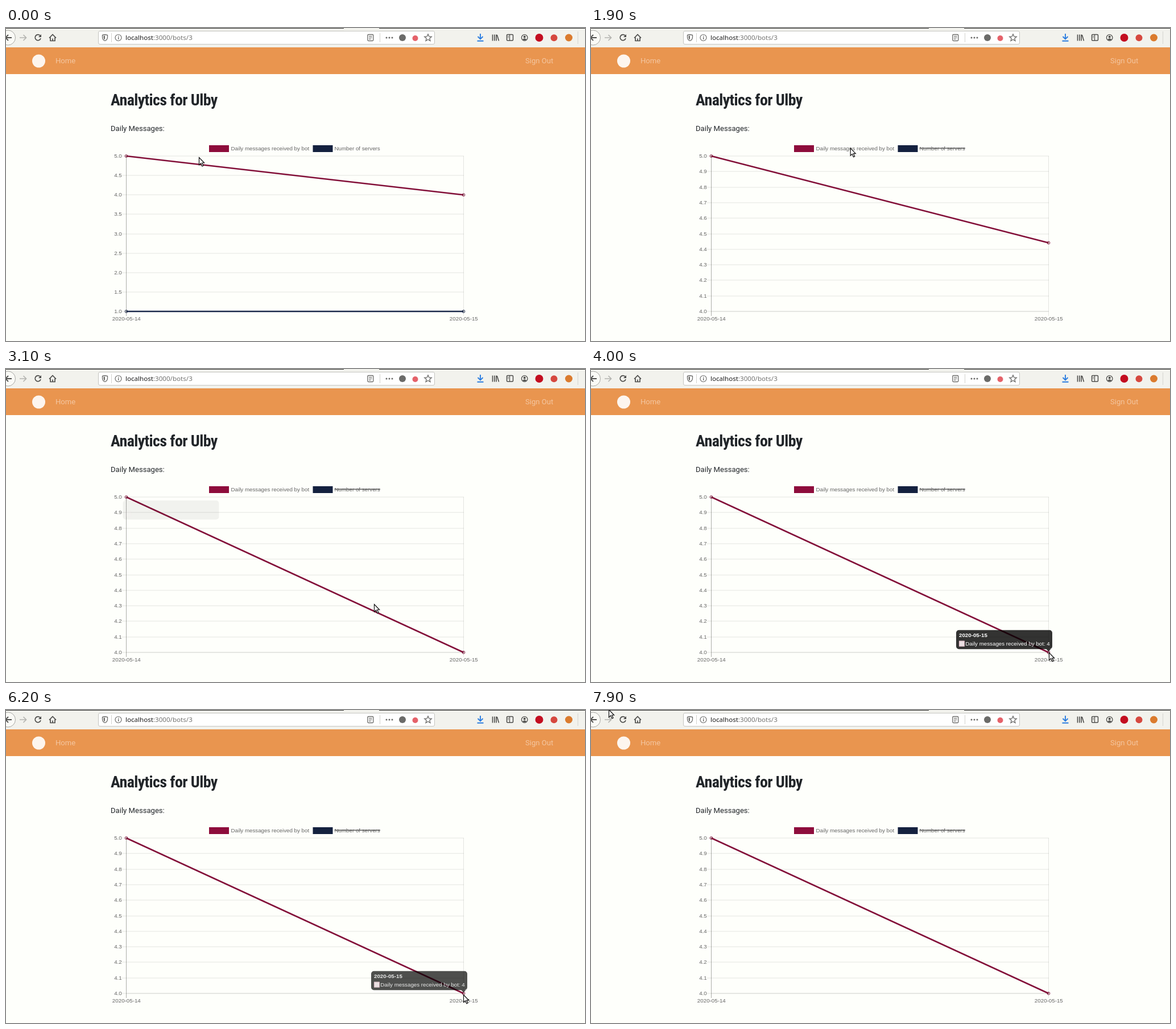
Recreate the animation shown at these times as an HTML page with a canvas. Size 1018x550 px, loop 8 s.

```html
<!DOCTYPE html>
<html lang="en">
<head>
<meta charset="utf-8">
<title>Bot analytics</title>
<style>
html, body { margin: 0; width: 100%; height: 100%; overflow: hidden; background: #fefffb; }
canvas { display: block; }
</style>
</head>
<body>
<canvas id="stage" width="1018" height="550"></canvas>
<script>
const ctx = document.getElementById('stage').getContext('2d');
const LOOP = 8000, STEP = 100, HIDE_AT = 1776;
const MAROON = '#8e0d3c', NAVY = '#14213f', INK = '#212529', ICON = '#4d4d4b';
const LEFT = 211.5, RIGHT = 804.5, TOP = 225, BOTTOM = 498;
const SMALL = '9.75px "Liberation Sans", Arial, sans-serif';
const BODY = '13.1px Roboto, sans-serif';

// Cursor stops: time, x, y
const stops = [
  [200, 339, 227], [300, 320, 240], [500, 392, 264], [600, 392, 264],
  [700, 437, 235], [800, 405, 192], [900, 377, 220], [1000, 377, 220],
  [1300, 401, 207], [1400, 401, 207], [1700, 597, 207], [1800, 597, 207],
  [2100, 173, 218], [2400, 215, 229], [2500, 212, 226], [2800, 213, 226],
  [3100, 647, 413], [3600, 800, 494], [4000, 805, 498], [5400, 805, 498],
  [5500, 804, 500], [6300, 804, 500], [7200, 324, 376], [7300, 324, 376],
  [7700, 60, 90], [7900, 31, -1]
];

const clamp = v => Math.min(1, Math.max(0, v));
const easeOut = v => 1 - (1 - clamp(v)) ** 4;
const fade = (t, start, end) => easeOut((t - start) / 400) * (1 - easeOut((t - end) / 400));

function text(str, x, y, font, color, align = 'left') {
  ctx.font = font;
  ctx.fillStyle = color;
  ctx.textAlign = align;
  ctx.fillText(str, x, y);
}

function rect(x, y, w, h, color) {
  ctx.fillStyle = color;
  ctx.fillRect(x, y, w, h);
}

function path(d, stroke, width = 1.5, fill) {
  const p = new Path2D(d);
  if (fill) { ctx.fillStyle = fill; ctx.fill(p); }
  if (stroke) { ctx.strokeStyle = stroke; ctx.lineWidth = width; ctx.stroke(p); }
}

function circle(x, y, r, fill, stroke, width = 1) {
  ctx.beginPath();
  ctx.arc(x, y, r, 0, Math.PI * 2);
  if (fill) { ctx.fillStyle = fill; ctx.fill(); }
  if (stroke) { ctx.strokeStyle = stroke; ctx.lineWidth = width; ctx.stroke(); }
}

function roundRect(x, y, w, h, r, fill, stroke, width = 1) {
  ctx.beginPath();
  ctx.roundRect(x, y, w, h, r);
  if (fill) { ctx.fillStyle = fill; ctx.fill(); }
  if (stroke) { ctx.strokeStyle = stroke; ctx.lineWidth = width; ctx.stroke(); }
}

function drawToolbar() {
  rect(0, 0, 1018, 34, '#f2f2ed');
  rect(0, 0, 594, 1, '#353533');
  rect(656, 0, 362, 1, '#353533');

  circle(3.5, 17, 13, '#fafaf6', '#a9a9a5');
  path('M10 17H-2M4 12L-1 17L4 22', ICON, 1.8);
  path('M24 17H35M30.5 12L35.5 17L30.5 22', '#b4b4b0', 1.7);
  path('M60 13.5A5 5 0 1 0 61 18', ICON, 1.7);
  path('M62 11V16H57Z', null, 0, ICON);
  path('M76 17.5L82 11.5L88 17.5M78 16.5V22.5H86V16.5M82 22V18.5', ICON, 1.7);

  roundRect(162.5, 5.5, 591, 23, 2.5, '#fff', '#c5c5c1');
  path('M169.5 12.5L174 11.5L178.5 12.5V16C178.5 19.5 176.5 21.5 174 22.5C171.5 21.5 169.5 19.5 169.5 16Z', '#6b6b69', 1.3);
  path('M174 13.5V20.5C172 19.5 171.5 18 171.5 14Z', null, 0, '#6b6b69');
  rect(185, 9, 1, 16, '#d2d2ce');
  circle(197.5, 17, 5.5, null, '#6b6b69', 1.2);
  rect(197, 16, 1.4, 4, '#6b6b69');
  rect(197, 13.7, 1.4, 1.4, '#6b6b69');
  const urlFont = '11.6px "Noto Sans", "Open Sans", sans-serif';
  text('localhost', 210, 21, urlFont, '#1c1c1c');
  text(':3000/bots/3', 210 + ctx.measureText('localhost').width, 21, urlFont, '#747472');

  roundRect(635.8, 11.5, 10, 11, 1.5, null, '#6b6b69', 1.3);
  path('M638 14.5H643.5M638 17H643.5M638 19.5H641.5', '#6b6b69', 1);
  rect(657, 9, 1, 16, '#d2d2ce');
  for (let i = 0; i < 3; i++) circle(669 + i * 5, 17, 1.5, '#6b6b69');
  circle(697, 17, 6, '#6b6b69');
  circle(719.5, 18, 5, '#e5626a');
  path('M742 10.8L743.8 15L748.2 15.3L744.8 18.2L745.9 22.6L742 20.2L738.1 22.6L739.2 18.2L735.8 15.3L740.2 15Z', '#6b6b69', 1.3);

  path('M834 10V19M829.5 15L834 19.5L838.5 15M828.5 22.8H839.5', '#2b7de0', 1.9);
  path('M855.5 11.5V22.5M858.8 11.5V22.5M862 11.5V22.5M863.3 12L866.5 22.5', ICON, 1.6);
  roundRect(880.5, 11.5, 11, 10.5, 1.5, null, ICON, 1.5);
  path('M885.5 12V22M882 14.5H884M882 17H884', ICON, 1.2);
  circle(911.7, 17, 5.3, null, ICON, 1.3);
  circle(911.7, 15.4, 2, ICON);
  path('M908.3 20Q911.7 16.5 915.1 20Q911.7 23 908.3 20Z', null, 0, ICON);
  circle(937.5, 17, 7, '#c30d20');
  circle(963.5, 17.3, 6, '#d6483f');
  circle(989.5, 17, 6.5, '#db7b2e');
  rect(1005, 6, 1, 22, '#d5d5d0');
}

function drawPage() {
  rect(0, 34, 1018, 47, '#e9954f');
  circle(57.5, 58, 11.5, '#fdf5ee');
  text('Home', 87, 61.5, BODY, '#f4c6a0');
  text('Sign Out', 913, 61.5, BODY, '#f4c6a0');
  ctx.letterSpacing = '-0.6px';
  text('Analytics for Ulby', 184, 135.5,
    'bold condensed 28px "Roboto Condensed", "Open Sans Condensed", Roboto, sans-serif', INK);
  ctx.letterSpacing = '0px';
  text('Daily Messages:', 184, 180.5, BODY, INK);
}

function drawSeries(y0, y1, color) {
  path(`M${LEFT} ${y0}L${RIGHT} ${y1}`, color, 2.5);
  circle(LEFT, y0, 2.4, 'rgba(0,0,0,.1)', color, 0.9);
  circle(RIGHT, y1, 2.4, 'rgba(0,0,0,.1)', color, 0.9);
}

function drawChart(t) {
  const hidden = t >= HIDE_AT;
  rect(357, 206, 35, 12, MAROON);
  text('Daily messages received by bot', 395.5, 214.5, SMALL, '#666');
  rect(539.5, 206, 35, 12, NAVY);
  text('Number of servers', 577.5, 214.5, SMALL, '#666');
  if (hidden) rect(577.5, 210.5, 80.5, 1.6, '#666');

  const count = hidden ? 10 : 8, size = hidden ? 0.1 : 0.5;
  for (let i = 0; i <= count; i++) {
    const y = Math.round(TOP + (BOTTOM - TOP) * i / count);
    rect(204, y - 0.5, 601, 1, 'rgba(0,0,0,.1)');
    text((5 - i * size).toFixed(1), 203.7, y + 3, SMALL, '#666', 'right');
  }
  rect(LEFT - 0.5, TOP, 1, BOTTOM - TOP + 8, 'rgba(0,0,0,.32)');
  rect(RIGHT - 0.5, TOP, 1, BOTTOM - TOP + 8, 'rgba(0,0,0,.1)');
  rect(LEFT, BOTTOM - 0.5, RIGHT - LEFT, 1, 'rgba(0,0,0,.1)');
  text('2020-05-14', LEFT + 0.3, 514.3, SMALL, '#666', 'center');
  text('2020-05-15', RIGHT + 0.3, 514.3, SMALL, '#666', 'center');

  const startY = TOP + (BOTTOM - TOP) / 4;
  const endY = startY + (BOTTOM - startY) * easeOut((t - HIDE_AT) / 1000);
  if (!hidden) drawSeries(BOTTOM, BOTTOM, '#1b294b');
  drawSeries(TOP, endY, '#831039');
}

function drawTooltip(x, y, caret, title, value, alpha) {
  if (alpha < 0.005) return;
  ctx.save();
  ctx.globalAlpha = alpha;
  const bubble = new Path2D();
  bubble.roundRect(x, y, 169, 33.5, 4.9);
  bubble.addPath(new Path2D(caret));
  ctx.fillStyle = 'rgba(0,0,0,.8)';
  ctx.fill(bubble);
  text(title, x + 5, y + 12.5, 'bold ' + SMALL, '#fff');
  rect(x + 5, y + 19, 9.8, 9.8, '#fff');
  rect(x + 5.5, y + 19.5, 8.8, 8.8, '#eadfe2');
  path(`M${x + 5.4} ${y + 19.4}h9v9h-9z`, '#d9a9b8', 0.8);
  text('Daily messages received by bot: ' + value, x + 16.3, y + 27.5, SMALL, '#fff');
  ctx.restore();
}

function drawCursor(t) {
  let i = stops.findIndex(s => s[0] > t);
  if (i < 0) i = stops.length - 1;
  const b = stops[i], a = stops[Math.max(0, i - 1)];
  const p = b === a ? 0 : clamp((t - a[0]) / (b[0] - a[0]));
  ctx.save();
  ctx.translate(a[1] + (b[1] - a[1]) * p, a[2] + (b[2] - a[2]) * p);
  path('M.5 .5V13.6L3.6 10.8L5.8 16L8 15L5.8 10H9.6Z', '#111', 1.2, '#fff');
  ctx.restore();
}

function frame(now) {
  const t = Math.floor(now % LOOP / STEP) * STEP;
  rect(0, 0, 1018, 550, '#fefffb');
  drawToolbar();
  drawPage();
  drawChart(t);
  drawTooltip(205.5, 231, 'M207.5 231L211.5 227L215.5 231Z', '2020-05-14', 5, fade(t, 2450, 2900));
  const last = fade(t, 3600, 5500) + fade(t, 6044, 6400);
  drawTooltip(642, 458.7, 'M800.5 492.2L804.5 496.2L808.5 492.2Z', '2020-05-15', 4, last);
  drawCursor(t);
  requestAnimationFrame(frame);
}
requestAnimationFrame(frame);
</script>
</body>
</html>
```
